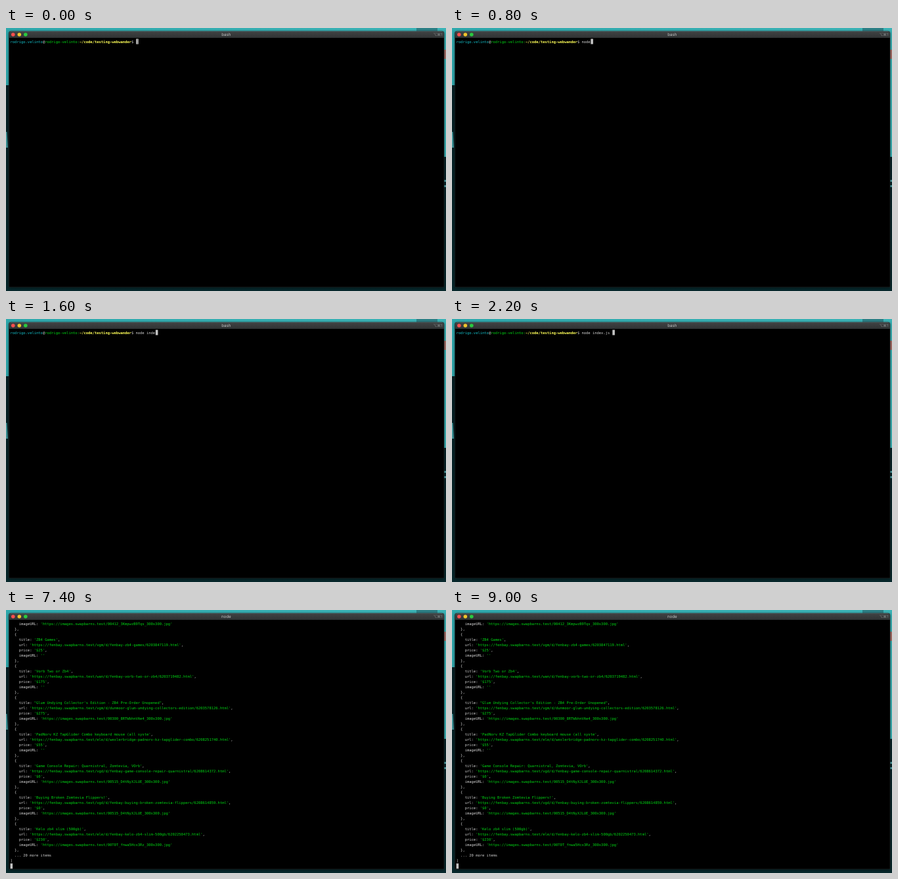
Recreate the animation shown at these times as an HTML page. Size 670 by 400 pixels, loop 9600 ms.

```html
<!DOCTYPE html>
<html lang="en">
<head>
<meta charset="utf-8">
<style>
  html, body { margin: 0; width: 100%; height: 100%; overflow: hidden; background: #000; }
  svg { display: block; width: 670px; height: 400px; }
  text { white-space: pre; text-rendering: geometricPrecision; }
  .term { font: 5.486px "DejaVu Sans Mono", monospace; fill: #d2d2d2; }
  .bar { font: 6.2px Inter, "Liberation Sans", sans-serif; fill: #c6c8c8; }
  .cyan { fill: #14c0ca; }
  .green { fill: #00d614; }
  .path { fill: #ffff58; font-weight: bold; }
</style>
</head>
<body>
<svg viewBox="0 0 670 400">
  <defs>
    <linearGradient id="sky" x1="0" x2="1" y1="0" y2="0">
      <stop offset="0" stop-color="#2fa9ad"/><stop offset="1" stop-color="#3cb4b7"/>
    </linearGradient>
    <linearGradient id="ground" x1="0" x2="0" y1="0" y2="1">
      <stop offset="0" stop-color="#061d21"/><stop offset="1" stop-color="#07282c"/>
    </linearGradient>
    <linearGradient id="head" x1="0" x2="0" y1="0" y2="1">
      <stop offset="0" stop-color="#404344"/><stop offset="1" stop-color="#303334"/>
    </linearGradient>
    <filter id="soft" x="-5%" width="110%" y="-5%" height="110%">
      <feGaussianBlur stdDeviation="2"/>
    </filter>
  </defs>

  <!-- desktop -->
  <rect width="670" height="400" fill="url(#ground)"/>
  <rect width="670" height="87" fill="url(#sky)"/>
  <rect x="625" width="32" height="5" fill="#2d7f85"/>
  <path d="M0 158H1.5L3 182H0z" fill="#3c9397"/>
  <rect x="660" y="87" width="10" height="109" fill="#3cb4b7"/>
  <rect x="667" y="33" width="3" height="14" fill="#a8736b"/>
  <path d="M667 232.5h3M667 240.5h3" stroke="#4b9a9e" stroke-width="3"/>

  <!-- window -->
  <rect x="4.5" y="6" width="662.5" height="389" fill="#000" opacity=".6" filter="url(#soft)"/>
  <path d="M4.5 394V8q0-3 3-3H664q3 0 3 3V394z" fill="#000" stroke="#25292a" stroke-width=".5"/>
  <path d="M4.5 15V8q0-3 3-3H664q3 0 3 3V15z" fill="url(#head)"/>
  <path d="M7 5.2H664" stroke="#5d6466" stroke-width=".5"/>
  <circle cx="10.8" cy="10" r="2.8" fill="#fb4f4e"/>
  <circle id="busy" cx="10.8" cy="10" r="1.1" fill="#6b0a0b"/>
  <circle cx="20.3" cy="10" r="2.8" fill="#f0c42c"/>
  <circle cx="29.8" cy="10" r="2.8" fill="#2ac940"/>
  <text id="title" class="bar" x="335.3" y="12.3" text-anchor="middle"></text>
  <text x="664.5" y="12.2" text-anchor="end" font-size="5.8" fill="#858a8b"
        font-family="Inter, 'DejaVu Sans', sans-serif">⌥⌘1</text>

  <g class="term">
    <g id="shell"></g>
    <g id="output"></g>
  </g>
  <rect id="cursor" width="3.6" height="8" fill="#c4c4c4"/>
  <path id="pointer" d="M199.2 17.8h1.6M200 17.8v5.4M199.2 23.2h1.6" fill="none" stroke="#555" stroke-width=".6"/>
</svg>
<script>
const LOOP = 9600, LEFT = 6.5, TOP = 16.5, COL = 3.303, ROW = 8.02;
const ENTER = 2900, RUN = 3200, PRINT = 7400;
const PROMPT_LENGTH = 58;
const $ = id => document.getElementById(id);

const typing = [
  [0, ''], [500, 'n'], [700, 'nod'], [800, 'node'], [1000, 'node '], [1400, 'node i'],
  [1500, 'node in'], [1600, 'node inde'], [2200, 'node index.js ']
];

// title, page path, price, image id
const items = [
  ["'ZB4 Games'", 'vgm/d/fenbay-zb4-games/6203847119', 25],
  ["'Vorb Two or Zb4'", 'wan/d/fenbay-vorb-two-or-zb4/6203719482', 175],
  ['"Glum Undying Collector\'s Edition - ZB4 Pre-Order Unopened"',
    'vgm/d/dunmoor-glum-undying-collectors-edition/6203578126', 275, '00300_8RTWbhnVAe4'],
  ["'PadNorv KZ TapGlider Combo keyboard mouse (all syste'",
    'ele/d/wexlerbridge-padnorv-kz-tapglider-combo/6208251740', 55],
  ["'Game Console Repair: Quarnistral, Zomtevia, VOrb'",
    'vgd/d/fenbay-game-console-repair-quarnistral/6208614372', 0, '00515_D4tNyXJLUE'],
  ["'Buying Broken Zomtevia Flippers!'",
    'vgd/d/fenbay-buying-broken-zomtevia-flippers/6208614859', 0, '00515_D4tNyXJLUE'],
  ["'Kelo zb4 slim (500gb)'", 'ele/d/fenbay-kelo-zb4-slim-500gb/6202250473', 230, '00T0T_fnwa5Hcx3Rz']
];

const image = id =>
  `    imageURL: '${id ? `https://images.swapbarns.test/${id}_300x300.jpg` : ''}'`;

const lines = [
  image('00412_3KmpwzB9Tqs'), '  },',
  ...items.flatMap(([title, page, price, id]) => [
    '  {',
    `    title: ${title},`,
    `    url: 'https://fenbay.swapbarns.test/${page}.html',`,
    `    price: '$${price}',`,
    image(id),
    '  },'
  ]),
  '  ... 20 more items', ']'
];

const span = (cls, text) => `<tspan class="${cls}">${text}</tspan>`;
const row = (html, i) => `<text x="${LEFT}" y="${TOP + 6 + i * ROW}">${html}</text>`;
const prompt = span('cyan', 'rodrigo.velinto') + '@' + span('green', 'rodrigo-velinto:') +
  span('path', '~/code/testing-webwander') + '$ ';

$('output').innerHTML = lines
  .map((line, i) => row(line.replace(/(['"]).*\1/, s => span('green', s)), i)).join('');

const show = (id, on) => $(id).setAttribute('visibility', on ? 'visible' : 'hidden');

function moveCursor(col, line) {
  $('cursor').setAttribute('x', LEFT + col * COL);
  $('cursor').setAttribute('y', TOP + line * ROW);
}

let shown;
function draw(now) {
  const t = now % LOOP;
  const command = typing.filter(([at]) => at <= t).pop()[1];
  const done = t >= PRINT;

  if (command !== shown) $('shell').innerHTML = row(prompt + command, 0);
  shown = command;

  $('title').textContent = t < RUN ? 'bash' : 'node';
  show('busy', t >= RUN && !done);
  show('pointer', t < 500);
  show('shell', !done);
  show('output', done);

  if (done) moveCursor(0, lines.length);
  else if (t >= ENTER) moveCursor(0, 1);
  else moveCursor(PROMPT_LENGTH + command.length, 0);
}

const start = performance.now();
function tick() {
  draw(performance.now() - start);
  requestAnimationFrame(tick);
}
tick();
</script>
</body>
</html>
```
